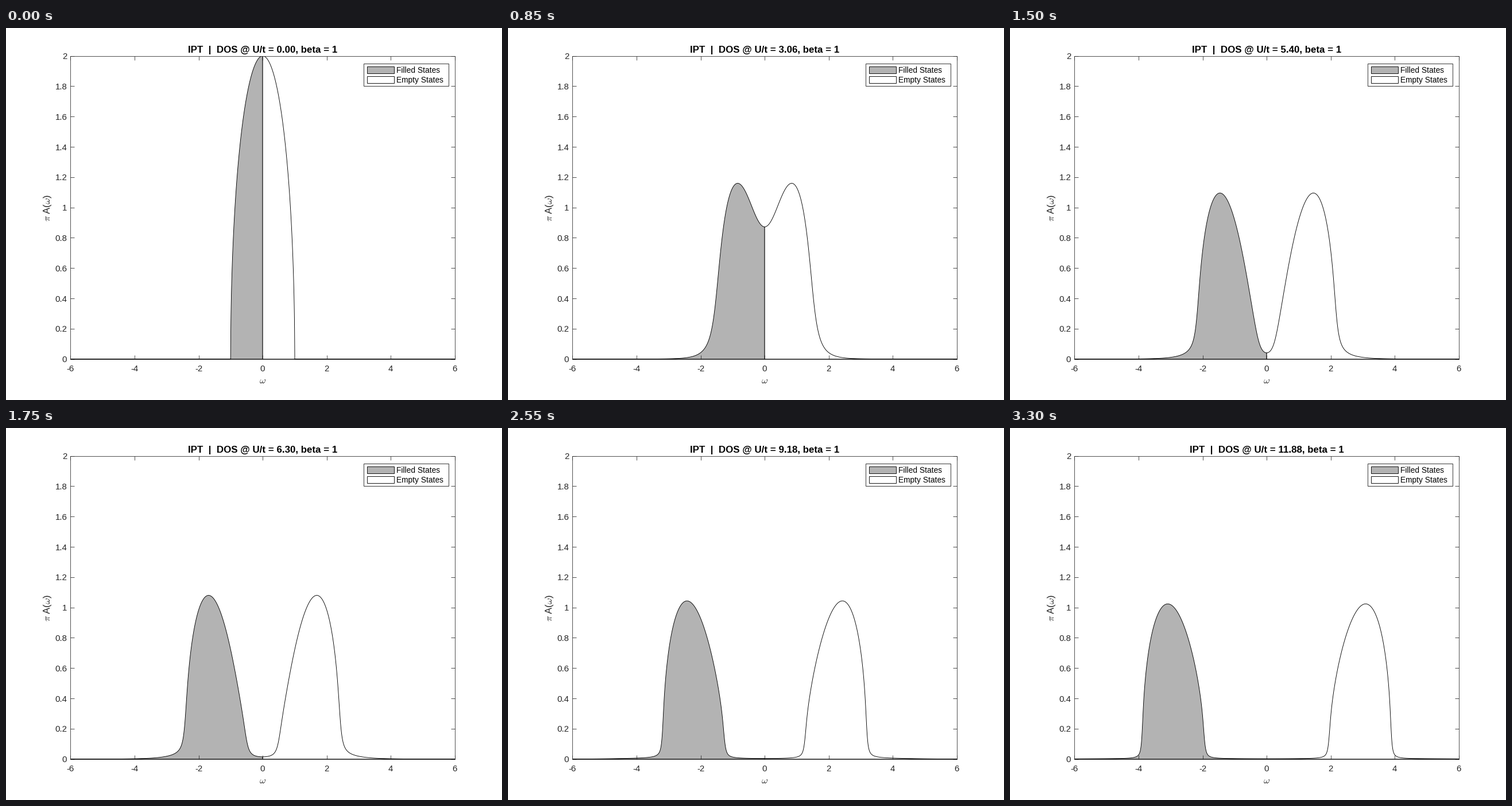
A matplotlib script that plays this animation: 864 by 648 pixels, repeating every 3350 ms.

```python
import numpy as np
import matplotlib.pyplot as plt
from matplotlib.animation import FuncAnimation
from matplotlib.patches import Polygon, Rectangle

plt.rcParams["font.family"] = "Liberation Sans"
plt.rcParams["mathtext.fontset"] = "cm"

WIDTH, HEIGHT, DPI = 864, 648, 72
FRAMES, INTERVAL = 67, 50
STEP = 0.18              # increase of U/t per frame
BETA, ETA = 1.0, 0.0055  # inverse temperature, broadening
DARK, GREY = "#262626", "#b3b3b3"

# Frequency grid; the half bandwidth is 1, so t = 1/2
N, PAD, W_MAX = 4095, 8192, 7.0
w = np.linspace(-W_MAX, W_MAX, N)
dw = w[1] - w[0]
fermi = 1 / (1 + np.exp(BETA * w))

# Discrete Hilbert kernel, nonzero at odd offsets only
k = np.fft.fftfreq(PAD, 1 / PAD)
odd = k % 2 == 1
kernel = np.zeros(PAD)
kernel[odd] = 2 / (np.pi * k[odd])
kernel_ft = np.fft.rfft(kernel)


def bethe(zeta):
    """Local Green's function of the Bethe lattice."""
    return 2 / (zeta + np.sqrt(zeta - 1) * np.sqrt(zeta + 1))


def self_energy(g0, u):
    """Second-order self-energy at half filling."""
    occupied = -g0.imag / np.pi * fermi
    triple = np.fft.irfft(np.fft.rfft(occupied, PAD) ** 3, PAD)[N - 1:2 * N - 1]
    im = -np.pi * (u * dw) ** 2 * np.maximum(triple + triple[::-1], 0)
    re = -np.fft.irfft(np.fft.rfft(im, PAD) * kernel_ft, PAD)[:N]
    return re + 1j * im


def solve(u, sigma):
    """Iterate the impurity problem to self-consistency."""
    z = w + 1j * (ETA if u > 0 else 0)
    for _ in range(150):
        g = bethe(z - sigma)
        if u == 0:
            break
        new = self_energy(1 / (z - g / 4), u)
        change = np.abs(new - sigma).max()
        sigma = new
        if change < 1e-4:
            break
    return -bethe(z - sigma).imag, sigma


spectra = []
sigma = np.zeros(N, complex)
for i in range(FRAMES):
    spectrum, sigma = solve(i * STEP / 2, sigma)
    spectra.append(spectrum)

fig = plt.figure(figsize=(WIDTH / DPI, HEIGHT / DPI), dpi=DPI, facecolor="white")
ax = fig.add_axes([0.13, 0.11, 0.775, 0.815])
ax.set(xlim=(-6, 6), ylim=(0, 2), xticks=range(-6, 7, 2),
       yticks=np.arange(11) / 5)
ax.set_axisbelow(False)
ax.tick_params(direction="in", top=True, right=True, length=6.7, width=0.8,
               color=DARK, labelbottom=False, labelleft=False)
for spine in ax.spines.values():
    spine.set(linewidth=0.8, color=DARK)

# Overlay in pixels, origin at the top left
page = fig.add_axes([0, 0, 1, 1])
page.set(xlim=(0, WIDTH), ylim=(HEIGHT, 0))
page.axis("off")


def label(x, y, text, size, ha="center", color=DARK, **style):
    return page.text(x, y, text, fontsize=size, ha=ha, va="baseline",
                     color=color, **style)


def box(x, y, width, height, face, edge="black"):
    page.add_patch(Rectangle((x, y), width, height, facecolor=face,
                             edgecolor=edge, linewidth=0.9))


for x in range(-6, 7, 2):
    label(447.1 + x * 55.8, 597.8, str(x), 15)
for j in range(11):
    label(106.3, 582.2 - j * 52.81, f"{j / 5:g}", 15, ha="right")
label(447, 619.3, r"$\omega$", 16.5)
label(76.5, 313, r"$\pi$ A($\omega$)", 16.5, rotation=90, rotation_mode="anchor")
title = label(447, 43, "", 16.9, color="black", weight="bold")

box(622.5, 61.5, 148, 39.5, "white", DARK)
for y, face, name in ((67, GREY, "Filled States"), (84, "white", "Empty States")):
    box(628.5, y, 47, 12, face)
    label(679.5, y + 11, name, 13.8, ha="left", color="black")

left = (w >= -6.001) & (w < dw / 2)
right = (w <= 6.001) & (w > -dw / 2)
areas = []
for side, face in ((left, GREY), (right, "white")):
    patch = Polygon([(0, 0), (0, 1)], closed=True, facecolor=face,
                    edgecolor="black", linewidth=0.9, zorder=1)
    ax.add_patch(patch)
    areas.append((patch, side))


def draw(i):
    for patch, side in areas:
        x, y = w[side], spectra[i][side]
        patch.set_xy(np.column_stack([np.r_[x[0], x, x[-1]], np.r_[0, y, 0]]))
    title.set_text(f"IPT  |  DOS @ U/t = {i * STEP:.2f}, beta = 1")
    return [patch for patch, _ in areas] + [title]


anim = FuncAnimation(fig, draw, frames=FRAMES, interval=INTERVAL,
                     repeat=True, repeat_delay=0)
plt.show()
```
